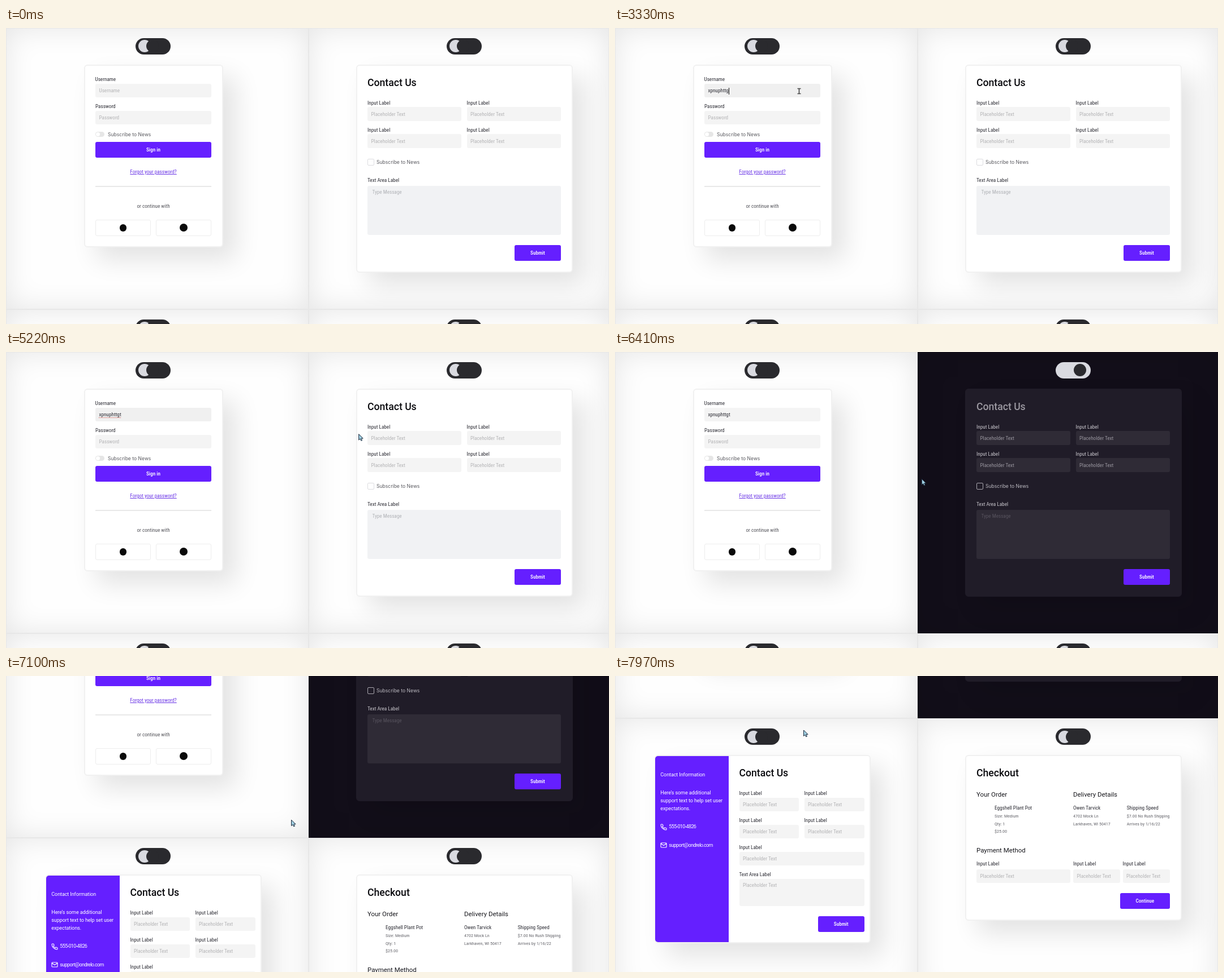
Animation, 1066 px wide and 525 px high, one loop 8000 ms. Source, as an HTML page:

```html
<!DOCTYPE html>
<html lang="en">
<head>
<meta charset="utf-8">
<title>Form cards</title>
<style>
html, body { margin: 0; width: 100%; height: 100%; overflow: hidden; background: #fff; }
#stage { position: relative; width: 100%; height: 100%; overflow: clip; contain: strict; }
#page, #page div, #cursor { position: absolute; box-sizing: border-box; }
#page {
  left: 0; top: 0; width: 1066px; height: 998px;
  font: 9.2px/20px "Roboto Condensed", Roboto, "Liberation Sans", sans-serif;
  font-stretch: 75%; letter-spacing: var(--track, 0);
  --panel: #fefefe; --edge: #e7e7e7; --inset: #0000001a; --card: #fff; --rim: #f1f1f1; --shadow: #0000001c;
  --title: #0b0b0f; --label: #2c2c34; --field: #f4f4f4; --hint: #b4b4b6;
  --area: #f1f2f4; --areaHint: #b0b2b6; --soft: #57575d; --check: #dcdce0;
  --pill: #2a2a2e; --moon: #d9dae0;
}
#page .dark {
  left: 0; top: 0; width: 100%; height: 100%;
  --panel: #120e19; --edge: #120e19; --inset: #0000001a; --card: #201c28; --rim: #201c28; --shadow: #0000001c;
  --title: #9c99a1; --label: #c9c7cd; --field: #2f2b36; --hint: #99969f;
  --area: #2f2b36; --areaHint: #57535e; --soft: #bebcc3; --check: #aaa7af;
  --pill: #d9dae0;
}
.panel { background: var(--panel); border: 1px solid var(--edge); box-shadow: inset 0 0 50px var(--inset); }
.card { background: var(--card); border: 2px solid var(--rim); border-radius: 6px; box-shadow: 22px 22px 45px var(--shadow); }
.field { background: var(--field); border-radius: 3px; }
.area { background: var(--area); border-radius: 3px; }
.button { background: #651fff; border-radius: 3px; }
.social { border: 1px solid #ededed; border-radius: 3px; }
.rule { background: #e8e8e8; }
.check { border: 1px solid var(--check); border-radius: 2px; }
.switch { background: #e6e6e6; border-radius: 9px; }
.knob { background: #fff; border-radius: 50%; }
.dot { background: #0a0a0a; border-radius: 50%; }
.pill { background: var(--pill); border-radius: 15px; }
.moon { background: var(--moon); border-radius: 50%; }
.cut { background: #2a2a2e; border-radius: 50%; }
.side { background: #651fff; border-radius: 5px 0 0 5px; }
.t { white-space: pre; color: var(--label); }
.mid { transform: translateX(-50%); }
.title, .head, .info, .contact { font-family: Roboto, "Liberation Sans", sans-serif; font-stretch: normal; letter-spacing: 0; }
.title { font-size: 17.6px; font-weight: 500; color: var(--title); }
.head { font-size: 11.45px; color: #17171c; }
.info, .contact { color: #fff; font-size: 9px; letter-spacing: -.08px; }
.contact { letter-spacing: -.63px; }
.hint { color: var(--hint); }
.areaHint { color: var(--areaHint); }
.news { font: 8.45px/20px Inter, "Open Sans", sans-serif; letter-spacing: .07px; color: var(--soft); }
.small { font-size: 8.05px; color: #66666c; }
.or { color: #55555b; }
.white { color: #fff; font-weight: 500; }
.link { color: #6a35e6; text-decoration: underline; }
#caret { display: inline-block; width: 1px; height: 12px; margin-right: -1px; background: #111; vertical-align: middle; }
.typo { text-decoration: underline dotted #c8443c 1px; text-underline-offset: 2px; }
#page svg { position: absolute; fill: none; stroke: #fff; stroke-width: 2.2; stroke-linejoin: round; }
#cursor { left: 0; top: 0; overflow: visible; }
</style>
</head>
<body>
<div id="stage">
  <div id="page"></div>
  <svg id="cursor" width="10" height="14">
    <path id="arrow" d="M0 0V10.5L2.5 8.3L4.2 11.8L6 11L4.4 7.6H7.6Z" fill="#9fcfe2" stroke="#1d2b3d"/>
    <path id="beam" d="M-3 -4.5H3M-3 4.5H3M0 -4.5V4.5" fill="none" stroke="#4a4a4a" stroke-width="1.7"/>
  </svg>
</div>
<script>
const $ = id => document.getElementById(id);
const LOOP = 8000, TYPED = 'xpnuphttgt', CLICK = 5730, ROW2 = 424;

const box = (x, y, w, h, cls, id = '') =>
  `<div class="${cls}" id="${id}" style="left:${x}px;top:${y}px;width:${w}px;height:${h}px"></div>`;
// y is the vertical middle of the line
const text = (x, y, str, cls = '') =>
  `<div class="t ${cls}" style="left:${x}px;top:${y - 10}px">${str}</div>`;
const lines = (x, ys, strs, cls) => strs.map((s, i) => text(x, ys[i], s, cls)).join('');
const field = (x, y, w, label = 'Input Label', hint = 'Placeholder Text', gap = 7.5, h = 24.5) =>
  text(x, y - gap, label) + box(x, y, w, h, 'field') + text(x + 6.5, y + (h > 30 ? 11 : 12.5), hint, 'hint');
const button = (x, y, w, label) => box(x, y, w, 28, 'button') + text(x + w / 2, y + 13.8, label, 'white mid');
const toggle = (x, y, cut = 29.3) =>
  box(x, y, 62, 28.8, 'pill') + box(x + 4.5, y + 3.4, 22, 22, 'moon') + box(x + cut - 11, y + 3.4, 22, 22, 'cut');

function login() {
  return box(0, 0, 535, 499, 'panel') + toggle(229.3, 17.8) + box(137.5, 64.5, 246, 324.5, 'card') +
    text(157.5, 91, 'Username') + box(158, 98.5, 205, 24.5, 'field', 'user') +
    text(164.5, 111, '<span id="typed"></span><span id="caret"></span><span id="empty" class="hint">Username</span>') +
    field(158, 146.5, 205, 'Password', 'Password') +
    box(158, 184, 16, 9, 'switch') + box(159, 185, 7, 7, 'knob') + text(180, 188.5, 'Subscribe to News', 'news') +
    button(158, 202, 205, 'Sign in') + text(260.5, 255, 'Forgot your password?', 'link mid') +
    box(158, 280, 205, 2, 'rule') + text(260.5, 316, 'or continue with', 'or mid') +
    box(157.5, 340, 98.5, 29, 'social') + box(264.5, 340, 98.5, 29, 'social') +
    box(200.5, 348, 12.6, 12.6, 'dot') + box(306.7, 347.3, 14, 14, 'dot');
}

function contact(cut) {
  const grid = [140, 188].map(y => field(639, y, 166) + field(814.5, y, 166)).join('');
  return box(535, 0, 531, 499, 'panel') + toggle(779, 17.8, cut) + box(618.5, 64.5, 383, 369, 'card') +
    text(639, 96.5, 'Contact Us', 'title') + grid +
    box(638.5, 231.5, 12, 12, 'check') + text(655, 238, 'Subscribe to News', 'news') +
    text(639, 270, 'Text Area Label') + box(639, 279.5, 342, 87.5, 'area') + text(647.5, 290.5, 'Type Message', 'areaHint') +
    button(899, 385.4, 82, 'Submit');
}

function sideContact() {
  const o = ROW2;
  const grid = [215.5, 263.5].map(y => field(219.5, o + y, 105.5) + field(334.5, o + y, 106)).join('');
  const icon = (y, d) => `<svg style="left:80px;top:${o + y}px" width="12" height="12" viewBox="0 0 24 24"><path d="${d}"/></svg>`;
  return box(0, 499, 535, 499, 'panel') + toggle(229.3, o + 93.3) + box(69.5, o + 140, 382.5, 333.5, 'card') +
    box(71, o + 141.5, 130, 330.5, 'side') +
    lines(80.3, [175, 207, 221, 235].map(y => o + y),
      ['Contact Information', 'Here’s some additional', 'support text to help set user', 'expectations.'], 'info') +
    icon(261.5, 'M22 17v3a2 2 0 0 1-2 2A19 19 0 0 1 2 4a2 2 0 0 1 2-2h3a2 2 0 0 1 2 2l1 4-2.5 2.5a16 16 0 0 0 6 6L16 14l4 1a2 2 0 0 1 2 2z') +
    icon(293.8, 'M4 4H20a2 2 0 0 1 2 2V18a2 2 0 0 1-2 2H4a2 2 0 0 1-2-2V6a2 2 0 0 1 2-2zM2 6l10 7 10-7') +
    lines(95.3, [o + 267, o + 299.5], ['555-010-4826', 'support@ondrelo.com'], 'contact') +
    text(219.5, o + 172, 'Contact Us', 'title') + grid + field(219.5, o + 311.5, 221) +
    field(219.5, o + 359.5, 221, 'Text Area Label', 'Placeholder Text', 7.5, 48) +
    button(359, o + 425.8, 81.5, 'Submit');
}

function checkout() {
  const o = ROW2, ys = [234, 248.5, 262.5, 276].map(y => o + y);
  const item = (x, name, ...rest) => text(x, ys[0], name) + lines(x, ys.slice(1), rest, 'small');
  return box(535, 499, 531, 499, 'panel') + toggle(779, o + 93.3) + box(618.5, o + 140, 383, 293.5, 'card') +
    text(639, o + 172, 'Checkout', 'title') + text(639, o + 210, 'Your Order', 'head') +
    text(810, o + 210, 'Delivery Details', 'head') + text(639, o + 309, 'Payment Method', 'head') +
    item(671, 'Eggshell Plant Pot', 'Size: Medium', 'Qty: 1', '$25.00') +
    item(810, 'Owen Tarvick', '4702 Mock Ln', 'Larkhaven, WI 50417') +
    item(904.7, 'Shipping Speed', '$7.00 No Rush Shipping', 'Arrives by 1/16/22') +
    [[639, 166], [810, 83], [897.5, 83.5]].map(([x, w]) =>
      field(x, o + 342.5, w, 'Input Label', 'Placeholder Text', 9.5)).join('') +
    button(892.5, o + 385.4, 88.5, 'Continue');
}

$('page').innerHTML = login() + sideContact() + checkout() + contact() + `<div class="dark" id="dark">${contact(43)}</div>`;

// Tighten the tracking where only the normal width of the font exists
const sample = [...document.querySelectorAll('.hint')].find(e => e.textContent === 'Placeholder Text');
const em = sample.getBoundingClientRect().width / 9.2;
if (em > 6.9) $('page').style.setProperty('--track', (6.57 - em) / 16 * 9.2 + 'px');

const keys = [[2250, 1], [2590, 2], [2650, 3], [2830, 5], [2980, 7], [3180, 8], [3330, 9], [3530, 10]];
const path = [
  [550, 523, 512], [750, 468, 395], [1000, 392, 225], [1200, 345, 145], [1350, 325.5, 112], [3530, 325.5, 112],
  [3800, 329, 146], [4050, 290, 250], [4310, 237, 337], [4600, 300, 345], [4900, 420, 320], [5120, 514, 235],
  [5220, 623, 146], [5450, 760, 60], [5650, 812, 34], [5900, 812, 34], [6200, 640, 150], [6410, 542.5, 225],
  [6600, 504.5, 252], [6860, 504.5, 253], [7460, 504.5, 258.5], [7640, 504.5, 258.5], [7970, 333.5, 96]
];
const ramp = (t, start, length) => Math.min(1, Math.max(0, (t - start) / length));
const ease = p => p * p * (3 - 2 * p);

function pointer(t) {
  const i = path.findIndex(p => p[0] > t);
  if (i < 1) return path.at(i ? -1 : 0).slice(1);
  const [a, b] = [path[i - 1], path[i]], p = (t - a[0]) / (b[0] - a[0]);
  return [a[1] + (b[1] - a[1]) * p, a[2] + (b[2] - a[2]) * p];
}

function draw(t) {
  const scroll = 212 * (ease(ramp(t, 6690, 300)) + ease(ramp(t, 7290, 300)));
  $('page').style.transform = `translateY(${-scroll}px)`;
  $('dark').style.opacity = ramp(t, CLICK, 300);

  const [last, count] = keys.filter(k => k[0] <= t).pop() || [1570, 0];
  const focused = t >= 1570 && t < CLICK;
  $('typed').textContent = TYPED.slice(0, count);
  $('typed').className = t > 4000 && focused ? 'typo' : '';
  $('empty').style.display = count ? 'none' : '';
  $('caret').style.visibility = focused && (t - last) % 1000 < 500 ? 'visible' : 'hidden';
  $('user').style.background = t >= 1380 && t < CLICK ? '#f0f0f0' : '';

  const [x, y] = pointer(t);
  const typing = t < 5000 && x > 158 && x < 363 && (y > 98 && y < 123 || y > 146 && y < 171);
  $('cursor').style.transform = `translate(${x}px,${y}px)`;
  $('cursor').style.visibility = t < 550 ? 'hidden' : 'visible';
  $('arrow').style.display = typing ? 'none' : '';
  $('beam').style.display = typing ? '' : 'none';
}

const start = performance.now();
function tick() {
  draw((performance.now() - start) % LOOP);
  requestAnimationFrame(tick);
}
tick();
</script>
</body>
</html>
```
